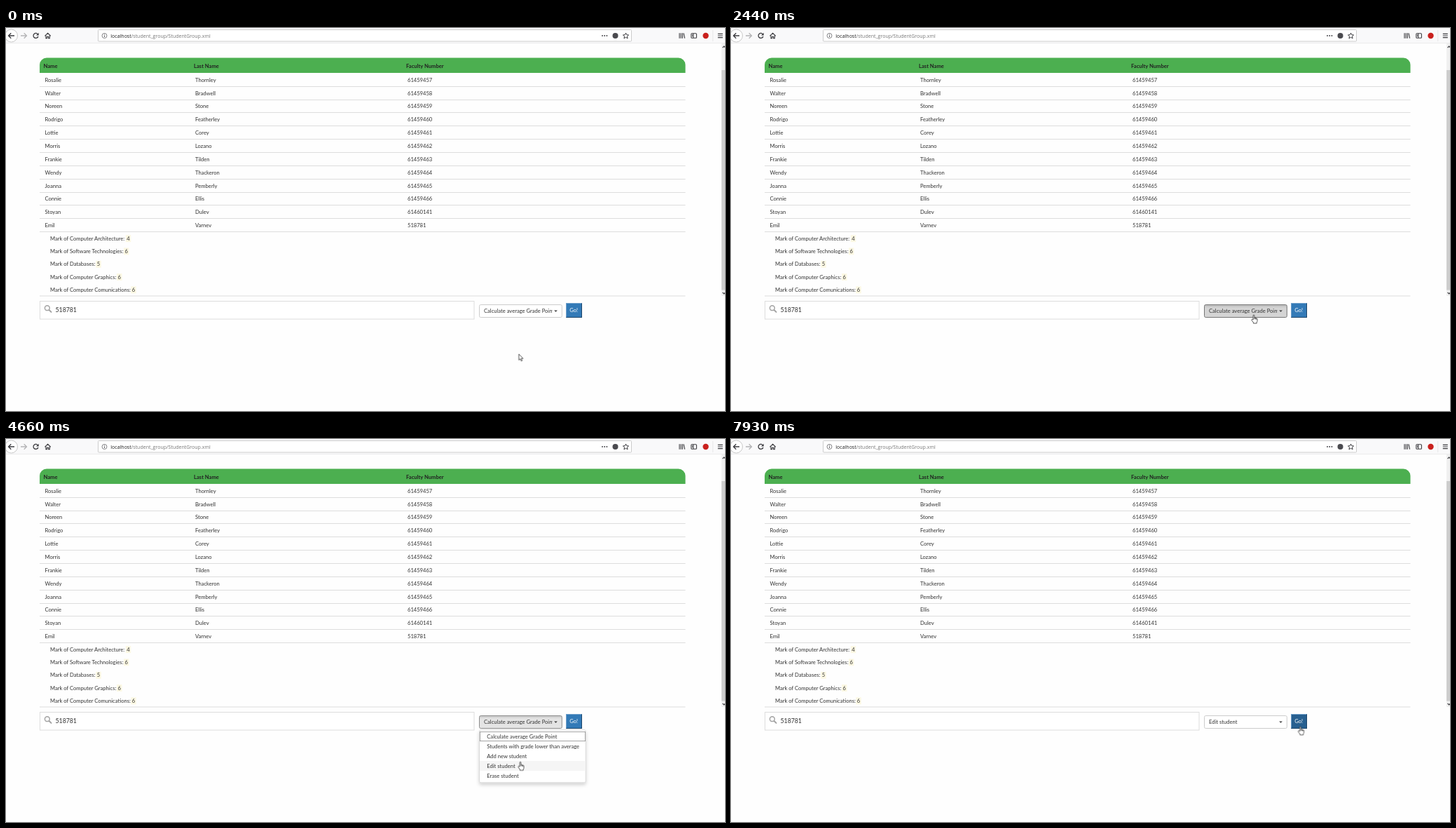
Write an HTML page that moves like this. It is 1026 by 546 pixels and loops after 8 s.

```html
<!DOCTYPE html>
<html lang="en">
<head>
<meta charset="utf-8">
<title>Student group</title>
<style>
html, body { margin: 0; width: 100%; height: 100%; overflow: hidden; background: #fefefe; }
svg { display: block; width: 1026px; height: 546px; }
text { font: 7.6px Lato, sans-serif; fill: #333; }
.head text { font-weight: 700; fill: #222; }
text.url { font: 7.03px "Open Sans", sans-serif; fill: #777; }
.icon { fill: none; stroke: #3c3c40; stroke-width: 1.1; }

/* All states share one 8 s clock; 1% = 80 ms. */
.anim { animation: 8s step-end infinite; }
#cursor { animation-name: move; }
#arrow { animation-name: arrow; }
#hand { animation-name: hand; }
#select { animation-name: select; }
#inset { animation-name: inset; }
#oldPick { animation-name: oldPick; }
#newPick { animation-name: newPick; }
#menu { animation-name: menu; }
#hover { animation-name: hover; }
#focus { animation-name: focus; }
#go { animation-name: go; }

@keyframes move {
  0% { transform: translate(731.8px, 464.8px); }
  2.775% { transform: translate(731.8px, 464.8px); animation-timing-function: steps(11); }
  13.5% { transform: translate(745px, 435px); animation-timing-function: steps(5); }
  18.5% { transform: translate(751px, 419px); animation-timing-function: steps(4); }
  22.625% { transform: translate(746px, 409px); }
  43.0625% { transform: translate(746px, 409px); animation-timing-function: steps(11); }
  53.375% { transform: translate(746px, 449px); animation-timing-function: steps(5); }
  58.25% { transform: translate(734px, 460.3px); }
  80.25% { transform: translate(734px, 460.3px); animation-timing-function: steps(4); }
  84.75% { transform: translate(810px, 415.4px); }
  89.5625% { transform: translate(810px, 415.4px); animation-timing-function: steps(3); }
  92.375% { transform: translate(811.5px, 415px); }
  93.8125% { transform: translate(811.5px, 415px); animation-timing-function: steps(3); }
  96.25%, 100% { transform: translate(812.5px, 409.8px); }
}
@keyframes arrow {
  0%, 74.875% { opacity: 1; }
  21.5875%, 95.4375%, 100% { opacity: 0; }
}
@keyframes hand {
  0%, 74.875% { opacity: 0; }
  21.5875%, 95.4375%, 100% { opacity: 1; }
}
@keyframes select {
  0%, 90.5%, 100% { fill: #fff; stroke: #ccc; }
  21.5875% { fill: #e6e6e6; stroke: #adadad; }
  30.5% { fill: #d4d4d4; stroke: #757575; }
  44% { fill: #e4e4e4; stroke: #8c8c8c; }
  74.875% { fill: #e6e6e6; stroke: #707070; }
}
@keyframes inset {
  0%, 74.875%, 100% { opacity: 0; }
  30.5% { opacity: 1; }
}
@keyframes oldPick {
  0% { opacity: 1; }
  74.875%, 100% { opacity: 0; }
}
@keyframes newPick {
  0% { opacity: 0; }
  74.875%, 100% { opacity: 1; }
}
@keyframes menu {
  0%, 74.875%, 100% { opacity: 0; }
  40.25% { opacity: 1; }
}
@keyframes hover {
  0% { opacity: 0; transform: translateY(0); }
  45.875% { opacity: 1; transform: translateY(0); }
  49.625% { opacity: 1; transform: translateY(14px); }
  52.4375% { opacity: 1; transform: translateY(28px); }
  58.25%, 100% { opacity: 1; transform: translateY(42px); }
}
@keyframes focus {
  0% { transform: translateY(0); }
  69%, 100% { transform: translateY(42px); }
}
@keyframes go {
  0% { fill: #337ab7; }
  95.4375%, 99.125%, 100% { fill: #286090; }
  98.125% { fill: #204d74; }
}
</style>
</head>
<body>
<svg viewBox="0 0 1026 546">
  <defs>
    <linearGradient id="shade" x2="0" y2="1">
      <stop offset="0" stop-opacity=".12"/>
      <stop offset="1" stop-opacity="0"/>
    </linearGradient>
    <filter id="shadow" x="-10%" y="-10%" width="120%" height="125%">
      <feDropShadow dx="0" dy="3" stdDeviation="2.6" flood-opacity=".18"/>
    </filter>
    <clipPath id="label"><path d="M680 394h99.3v20H680z"/></clipPath>
  </defs>

  <!-- Browser bar -->
  <path fill="#f9f9fa" d="M0 0h1026v21.5H0z"/>
  <path fill="#e6e6e7" d="M0 21.3h1026v.6H0z"/>
  <rect x="131.5" y="2.5" width="761" height="16.5" rx="1" fill="#fff" stroke="#ccc"/>
  <circle cx="7.5" cy="11" r="9" fill="#fff" stroke="#bbb" stroke-width=".8"/>
  <g class="icon">
    <path stroke-width="1.3" d="M12 11H3.8M7.3 7.2L3.5 11l3.8 3.8"/>
    <path stroke="#b4b4b6" stroke-width="1.3" d="M21 11h8M25.7 7.2l3.8 3.8-3.8 3.8"/>
    <path stroke-width="1.3" d="M45.6 9.2a3.5 3.5 0 1 0 .3 2.8"/>
    <path fill="#3c3c40" stroke="none" d="M46.7 6.8v3.6h-3.6z"/>
    <path d="M55.4 11.3l4.2-4 4.2 4M56.9 10.6v4h1.7v-2.4h2v2.4h1.7v-4"/>
    <circle cx="140.5" cy="11" r="3.5" stroke="#66666a" stroke-width=".8"/>
    <path stroke="#66666a" d="M140.5 10.4v2.6M140.5 8.6v1"/>
    <path stroke-width="1.8" stroke-linecap="round" stroke-dasharray="0 3.2" d="M851 11h7"/>
    <path stroke-width="1" d="M884.5 7l1.2 2.7 2.9.3-2.2 1.9.7 2.9-2.6-1.5-2.6 1.5.7-2.9-2.2-1.9 2.9-.3z"/>
    <path d="M961 7.2v7.6M963.2 7.2v7.6M965.4 7.2v7.6M967 7.4l1.6 7.3"/>
    <rect x="977.8" y="7.8" width="7.6" height="6.4" rx="1"/>
    <path d="M980.8 8v6M979 9.7h1M979 11.4h1"/>
    <path d="M1015.8 8.4h7M1015.8 11h7M1015.8 13.6h7"/>
  </g>
  <circle cx="869.5" cy="11" r="4" fill="#4a4a4f"/>
  <circle cx="998.5" cy="11" r="4.2" fill="#c9201d"/>
  <path fill="#ddd" d="M1008.5 3h.6v16h-.6z"/>
  <text class="url" x="149.3" y="13.6"><tspan fill="#222">localhost</tspan>/student_group/StudentGroup.xml</text>

  <!-- Scrollbar -->
  <path fill="#f0f0f0" d="M1021 22h5v360h-5z"/>
  <path fill="#cdcdcd" d="M1021 60h5v313.5h-5z"/>
  <path class="icon" d="M1022.6 28l2-2 2 2M1022.6 377l2 2 2-2"/>

  <!-- Table -->
  <path fill="#4caf50" d="M48 64V52.5a10 10 0 0 1 10-10h901.5a10 10 0 0 1 10 10V64z"/>
  <g class="head">
    <text x="53.5" y="56.6">Name</text>
    <text x="268" y="56.6">Last Name</text>
    <text x="571" y="56.6">Faculty Number</text>
  </g>
  <g id="rows"></g>
  <path fill="#ddd" d="M48 381.5h921.5v1H48z"/>

  <!-- Search field -->
  <rect x="48.5" y="389.5" width="619.5" height="25.5" fill="#fff" stroke="#ddd"/>
  <g fill="none" stroke="#a3a3a3">
    <circle cx="58.8" cy="399.2" r="3.4" stroke-width="1.5"/>
    <path stroke-width="2" stroke-linecap="round" d="M61.8 402.2l2.7 2.7"/>
  </g>
  <text x="70.5" y="405.1" style="font-size:8.75px">518781</text>

  <!-- Select and button -->
  <rect id="select" class="anim" x="675.5" y="394.5" width="117.8" height="18" rx="2"/>
  <rect id="inset" class="anim" x="676" y="395" width="116.8" height="4" fill="url(#shade)"/>
  <g clip-path="url(#label)">
    <text id="oldPick" class="anim" x="682" y="406.2">Calculate average Grade Point</text>
    <text id="newPick" class="anim" x="682" y="406.2">Edit student</text>
  </g>
  <path fill="#333" d="M782.2 402.4h4.6l-2.3 2.4z"/>
  <path id="go" class="anim" d="M799 392h23v21h-23z"/>
  <path fill="#6f9fca" d="M799 392h23l-1 1h-21v19l-1 1z"/>
  <path fill="#1d4569" d="M822 392v21h-23l1-1h21v-19z"/>
  <text x="804.3" y="405.2" style="fill:#fff">Go!</text>

  <!-- Menu -->
  <g id="menu" class="anim">
    <rect x="675.5" y="414.8" width="151.7" height="75" rx="2" fill="#fff" stroke="#ccc" stroke-width=".7" filter="url(#shadow)"/>
    <path id="hover" class="anim" fill="#f5f5f5" d="M676 417h151v14H676z"/>
    <rect id="focus" class="anim" x="676.4" y="417.4" width="150.2" height="13.2" fill="none" stroke="#8f8f8f" stroke-width=".8"/>
    <g id="items"></g>
  </g>

  <!-- Pointer -->
  <g id="cursor" class="anim" fill="#fff" stroke="#222" stroke-width=".75" stroke-linejoin="round">
    <path id="arrow" class="anim" d="M0 0v8.6l2-1.8 1.4 3.2 1.4-.6-1.4-3.1h2.7z"/>
    <path id="hand" class="anim" d="M-.9 7V.9Q-.8 0 0 0T.9 .9V4.2Q1.8 3.6 2.3 4.5 3.2 4 3.6 4.9 4.8 4.6 5 5.8V8.4Q5 9.8 4.2 10.6V12H-.6V10.8L-3 7.6Q-3.4 6.4-2.4 6.1-1.6 6-.9 7zM.9 4.2V6.2M2.3 4.5V6.3M3.6 4.9V6.5"/>
  </g>
</svg>
<script>
const people = `Rosalie Thornley 61459457
Walter Bradwell 61459458
Noreen Stone 61459459
Rodrigo Featherley 61459460
Lottie Corey 61459461
Morris Lozano 61459462
Frankie Tilden 61459463
Wendy Thackeron 61459464
Joanna Pemberly 61459465
Connie Ellis 61459466
Stoyan Dulev 61460141
Emil Varnev 518781`.split("\n");

const marks = [
  ["Computer Architecture", 4, 172.3],
  ["Software Technologies", 6, 169.5],
  ["Databases", 5, 129.8],
  ["Computer Graphics", 6, 159.6],
  ["Computer Comunications", 6, 179.8]
];

const options = ["Calculate average Grade Point", "Students with grade lower than average",
  "Add new student", "Edit student", "Erase student"];

const label = (x, y, s) => `<text x="${x}" y="${y}">${s}</text>`;
const box = (x, y, w, h, fill) => `<rect x="${x}" y="${y}" width="${w}" height="${h}" fill="${fill}"/>`;

const personRow = (line, i) => {
  const y = 76.7 + i * 18.85;
  const cells = line.split(" ").map((s, c) => label([55.5, 270, 573][c], y, s));
  return cells.join("") + box(48, Math.round(y + 6), 921.5, 1, "#ddd");
};

const markRow = ([name, mark, x], i) => {
  const y = 302.7 + i * 18.3;
  return label(63, y, `Mark of ${name}:`) + box(x - 1.5, y - 7.6, 7.4, 10, "#fcf8e3") + label(x, y, mark);
};

document.getElementById("rows").innerHTML = people.map(personRow).join("") + marks.map(markRow).join("");
document.getElementById("items").innerHTML = options.map((s, i) => label(686.3, 426.7 + i * 14, s)).join("");
</script>
</body>
</html>
```
